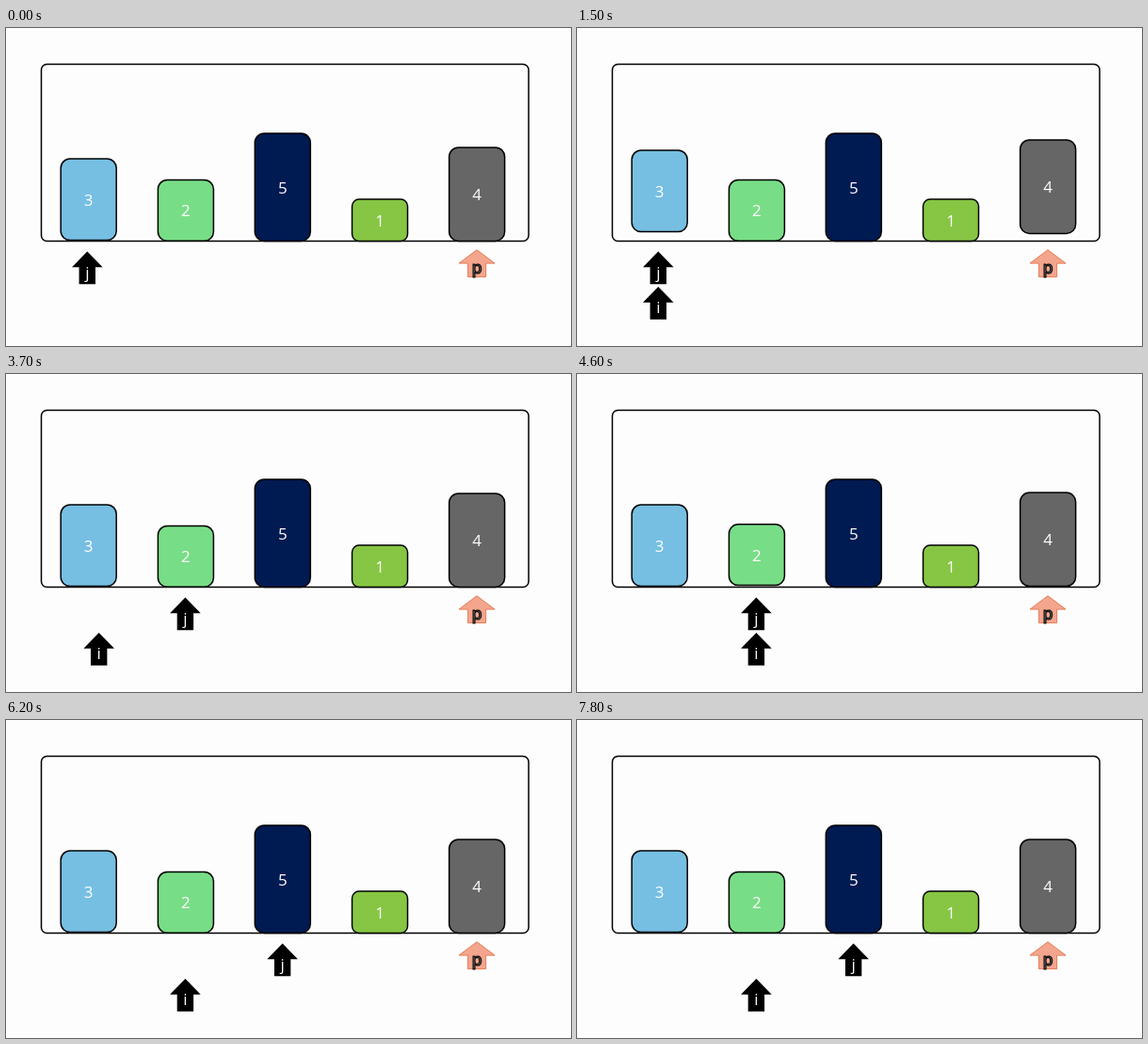
Write an HTML page that moves like this. It is 600x338 px and loops after 8000 ms.

```html
<!DOCTYPE html>
<html lang="en">
<head>
<meta charset="utf-8">
<title>Sorting steps</title>
<style>
  html, body { margin: 0; width: 100%; height: 100%; overflow: hidden; background: #fdfdfd; }
  svg { display: block; width: 100vw; height: 100vh; }
  text { font-family: "Open Sans", "Noto Sans", sans-serif; font-size: 17px; text-anchor: middle; fill: #fff; }
</style>
</head>
<body>
<svg id="stage" viewBox="0 0 600 338">
  <rect width="600" height="338" fill="#fdfdfd"/>
  <rect x="37.5" y="38.5" width="517.5" height="188" rx="6" fill="none" stroke="#000" stroke-width="1.5"/>
</svg>
<script>
const LOOP = 8000, STEP = 100, MOVE = 250;
const stage = document.getElementById('stage');

function add(parent, tag, attrs, text) {
  const el = document.createElementNS('http://www.w3.org/2000/svg', tag);
  for (const k in attrs) el.setAttribute(k, attrs[k]);
  if (text) el.textContent = text;
  return parent.appendChild(el);
}

function makeBar(value, x, top, bottom, fill) {
  const g = add(stage, 'g', {}), w = 59, h = bottom - top;
  add(g, 'rect', {
    x, y: top, width: w, height: h, rx: Math.min(w, h) / 6,
    fill, stroke: '#000', 'stroke-width': 1.5
  });
  add(g, 'text', { x: x + w / 2, y: (top + bottom) / 2 + 6.4 }, value);
  return g;
}

// Pointer drawn around x = 0 with its tip at y = 0
function makePointer(label) {
  const g = add(stage, 'g', {});
  add(g, 'path', { d: 'M0 0L16.3 16.7H8.7V34.7H-8.7V16.7H-16.3Z' });
  add(g, 'text', { x: 0, y: 28.2 }, label);
  return g;
}

const bars = {
  3: makeBar(3, 58.2, 139, 225.6, '#76bfe3'),
  2: makeBar(2, 161.4, 161.5, 226.3, '#78dd87'),
  5: makeBar(5, 264.3, 112, 226.4, '#001a52'),
  1: makeBar(1, 367.5, 182, 226.4, '#86c644'),
  4: makeBar(4, 470.6, 127, 226.4, '#666')
};

const pivot = add(stage, 'g', { transform: 'translate(500 235.8)' });
add(pivot, 'path', {
  d: 'M0 0L19 14.3H9.6V28.8H-9.6V14.3H-19Z',
  fill: '#f4a58d', stroke: '#e37d55'
});
add(pivot, 'text', {
  x: 0, y: 25.2, style: 'font-size:18px;font-weight:600;fill:#555', stroke: '#000', 'stroke-width': .9
}, 'p');

const j = makePointer('j'), i = makePointer('i');

const slots = [86.3, 190.4, 293.6];
const lift = { 2: 14.6, 3: 9, 4: 8, 5: 9 };
const compares = [
  { up: 1240, down: 2140, pair: [3, 4] },
  { up: 4540, down: 5340, pair: [2, 4] },
  { up: 6440, down: 7240, pair: [5, 4] }
];

// Constant acceleration, then constant braking
function ease(t, start, length = MOVE) {
  const p = Math.min(1, Math.max(0, (t - start) / length));
  return p < .5 ? 2 * p * p : 1 - 2 * (1 - p) ** 2;
}

function place(el, x, y) {
  el.setAttribute('transform', `translate(${x} ${y})`);
}

function draw(t) {
  const height = { 1: 0, 2: 0, 3: 0, 4: 0, 5: 0 };
  for (const { up, down, pair } of compares) {
    const k = ease(t, up) - ease(t, down);
    for (const n of pair) height[n] += k * lift[n];
  }
  for (const n in bars) place(bars[n], 0, -height[n]);

  const jx = slots[0] + (slots[1] - slots[0]) * ease(t, 2631) + (slots[2] - slots[1]) * ease(t, 5840);
  const ix = slots[0] + (slots[1] - slots[0]) * ease(t, 3639);
  place(j, jx, 237.5);
  place(i, ix, 275);
  i.setAttribute('opacity', Math.min(1, Math.max(0, (t - 350) / 300)));
}

// The picture advances ten times a second
const begin = performance.now();
function tick() {
  const t = (performance.now() - begin) % LOOP;
  draw(Math.floor(t / STEP) * STEP);
  requestAnimationFrame(tick);
}
draw(0);
requestAnimationFrame(tick);
</script>
</body>
</html>
```
